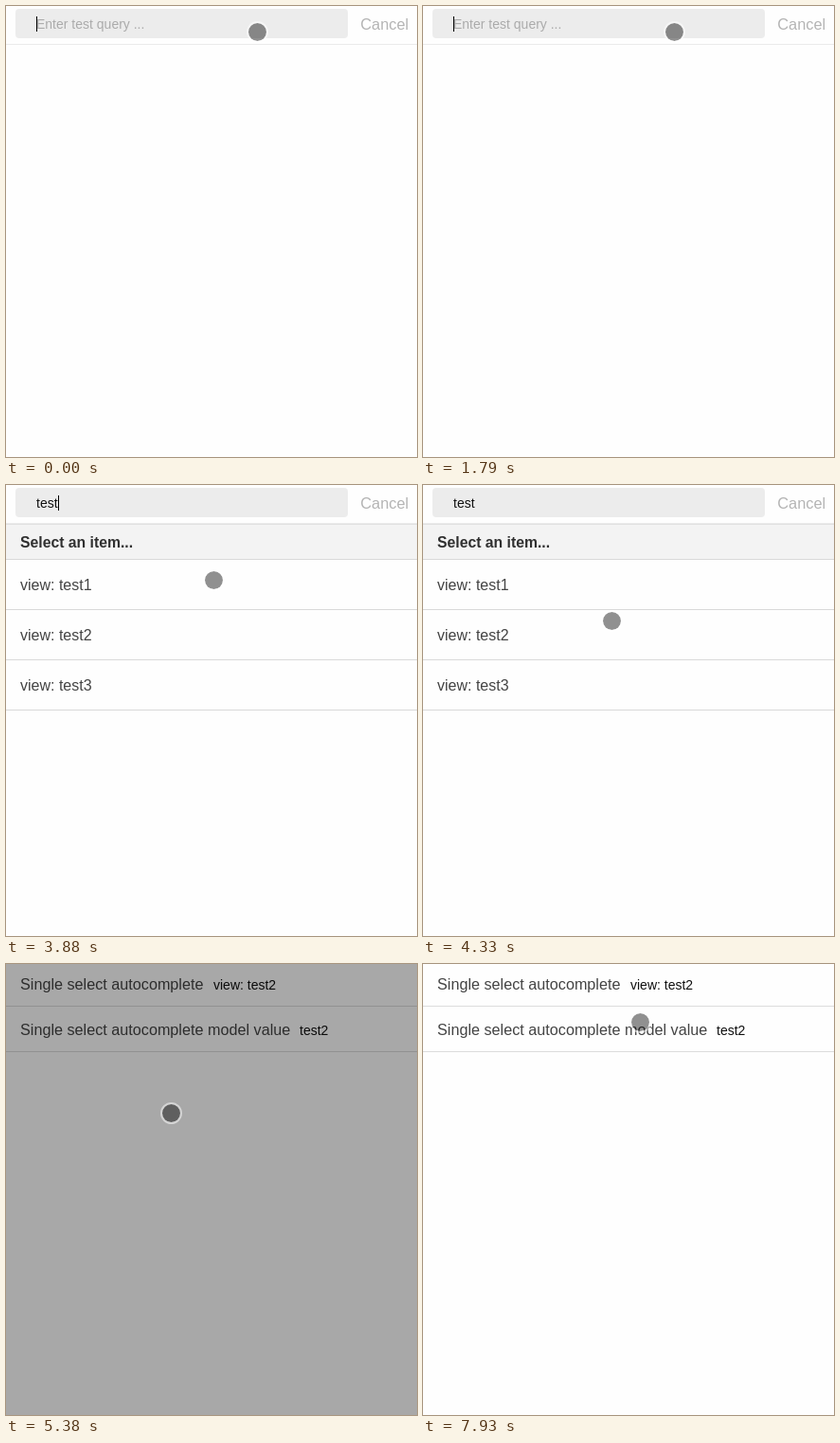
Animation of 434x476 px, one loop 8000 ms. Source, as an HTML page with a canvas:

```html
<!DOCTYPE html>
<html lang="en">
<head>
<meta charset="utf-8">
<title>Autocomplete</title>
<style>
  html, body { margin: 0; width: 434px; height: 476px; overflow: hidden; background: #fefefe; }
  canvas { display: block; }
</style>
</head>
<body>
<canvas id="stage" width="434" height="476"></canvas>
<script>
const ctx = document.getElementById('stage').getContext('2d');
const W = 434, H = 476, LOOP = 8000;

// Each entry holds from its time until the next one.
const pointer = [
  [0, 265.5, 27.5], [3590, 252.5, 52.5], [3740, 231, 81.5], [3880, 219.5, 100.5],
  [4030, 213.5, 112.5], [4180, 208.5, 125.5], [4330, 199.5, 143.5],
  [4480, 192.5, 154.5], [4630, 174.5, 157.5], [7930, 229.5, 61.5]
];
const caret = [
  [0, true], [300, false], [750, true], [1200, false], [1790, true],
  [2990, false], [3590, true], [4030, false], [4630, true], [5080, false]
];
const typed = [[0, '', 32], [2090, 'te', 44], [2540, 'test', 55]];
const CLOSE = 5380, UNDIM = 5530;

function at(track, t) {
  let hit = track[0];
  for (const key of track) if (key[0] <= t) hit = key;
  return hit;
}

function text(str, x, y, size, color, weight = 400) {
  ctx.font = `${weight} ${size}px "Liberation Sans", Arial, sans-serif`;
  ctx.fillStyle = color;
  ctx.fillText(str, x, y);
}

function rect(x, y, w, h, color) {
  ctx.fillStyle = color;
  ctx.fillRect(x, y, w, h);
}

function rule(y, color) {
  rect(0, y, W, 1, color);
}

function drawSearch(t) {
  const [, query, caretX] = at(typed, t);
  ctx.fillStyle = '#ececec';
  ctx.beginPath();
  ctx.roundRect(10, 3, 351, 31, 4);
  ctx.fill();
  rule(40, '#ebebeb');
  text('Cancel', 374.2, 25, 16.4, '#b4b4b4');
  if (query) text(query, 32, 24, 14, '#111');
  else text('Enter test query ...', 32, 24, 14, '#ababab');
  if (at(caret, t)[1]) rect(caretX, 11, 1, 16, '#000');
  if (query) drawList(query);
}

function drawList(query) {
  rect(0, 41, W, 37, '#f3f3f3');
  rule(41, '#e0e0e0');
  rule(78, '#d9d9d9');
  text('Select an item...', 15, 66, 15.75, '#303030', 700);
  for (let i = 0; i < 3; i++) {
    text(`view: ${query}${i + 1}`, 15, 111 + 53 * i, 16, '#444');
    rule(131 + 53 * i, '#d9d9d9');
  }
}

function drawForm() {
  text('Single select autocomplete', 15, 27, 16.2, '#444');
  text('view: test2', 219, 27, 14, '#111');
  rule(44, '#dcdcdc');
  text('Single select autocomplete model value', 15, 75, 16.2, '#444');
  text('test2', 310, 75, 14, '#111');
  rule(92, '#dcdcdc');
}

function drawPointer(x, y) {
  ctx.beginPath();
  ctx.arc(x, y, 9.5, 0, Math.PI * 2);
  ctx.fillStyle = 'rgba(0,0,0,0.43)';
  ctx.fill();
  ctx.beginPath();
  ctx.arc(x, y, 10.5, 0, Math.PI * 2);
  ctx.lineWidth = 2;
  ctx.strokeStyle = 'rgba(255,255,255,0.5)';
  ctx.stroke();
}

function draw(t) {
  rect(0, 0, W, H, '#fefefe');
  if (t < CLOSE) drawSearch(t);
  else drawForm();
  if (t >= CLOSE && t < UNDIM) rect(0, 0, W, H, 'rgba(0,0,0,0.34)');
  const [, x, y] = at(pointer, t);
  drawPointer(x, y);
}

function tick() {
  draw(performance.now() % LOOP);
  requestAnimationFrame(tick);
}
tick();
</script>
</body>
</html>
```
